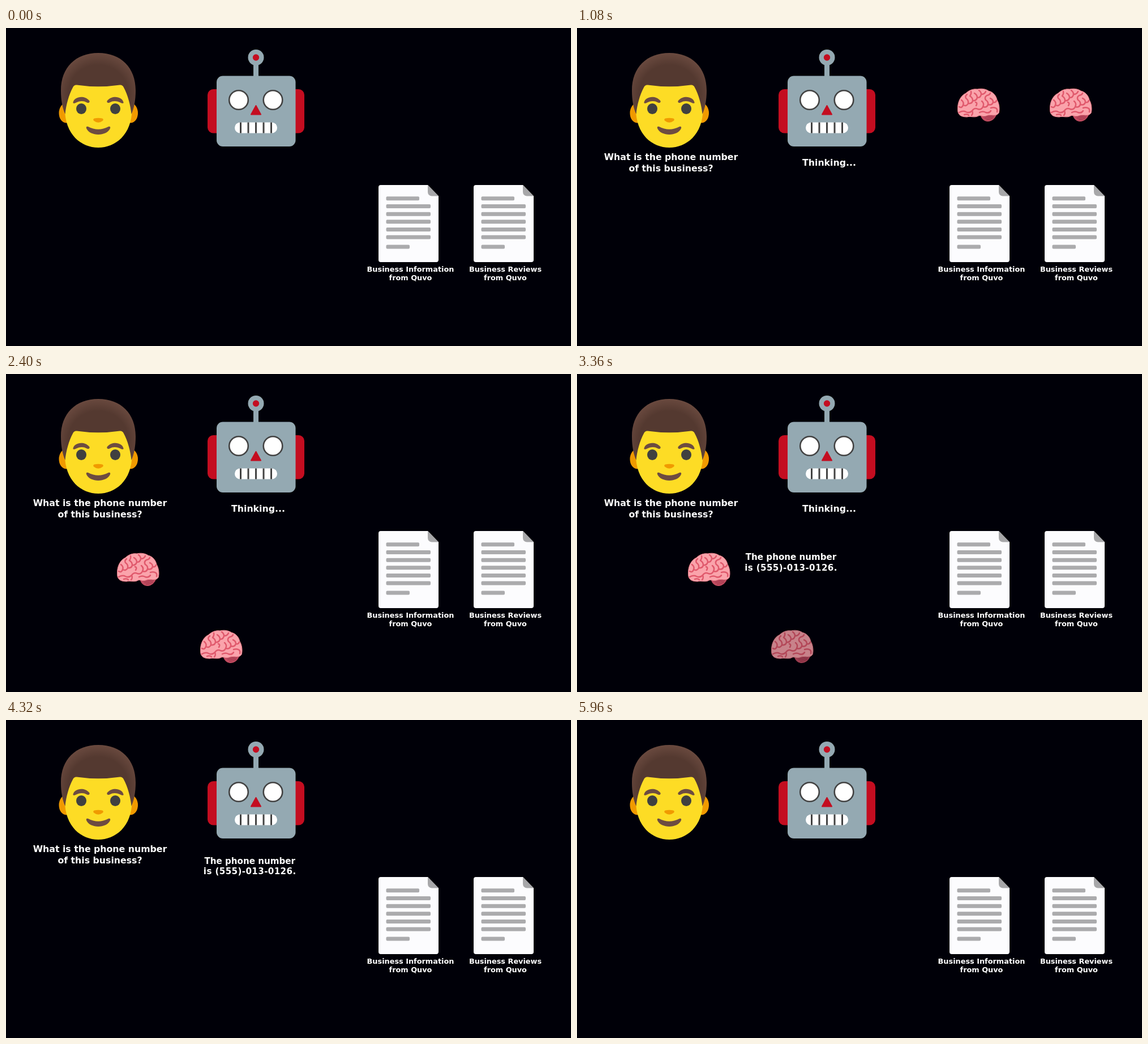
Recreate the animation shown at these times as an HTML page. Size 998 by 561 pixels, loop 6.04 s.

```html
<!DOCTYPE html>
<html lang="en">
<head>
<meta charset="utf-8">
<title>Asking the robot</title>
<style>
  html, body { margin: 0; width: 100%; height: 100%; overflow: hidden; background: #000008; }
  svg { display: block; width: 100%; height: 100%; }
  text { font-family: "DejaVu Sans", Verdana, sans-serif; font-weight: bold; fill: #fff; text-anchor: middle; }
  .big { font-size: 15.75px; }
  .reply { font-size: 15.1px; }
  .label { font-size: 12.85px; }
  .fold { fill: none; stroke: #e0596c; stroke-width: 2.5; stroke-linecap: round; stroke-linejoin: round; }
</style>
</head>
<body>
<svg viewBox="0 0 998 561">
  <defs>
    <radialGradient id="hairShade" gradientUnits="userSpaceOnUse" cx="163" cy="118" r="78">
      <stop offset=".68" stop-color="#543930"/>
      <stop offset="1" stop-color="#6d4c41"/>
    </radialGradient>

    <g id="brain">
      <path fill="#c24c61" d="M3 15C12 9 26 10 33 12C32 22 25 29 16 29C8 28 4 22 3 15Z"/>
      <path fill="none" stroke="#993549" stroke-width="1" d="M9 20Q20 22 31 15M11 23Q21 24 29 18M14 26Q21 26 27 22"/>
      <path fill="#faa3ab" stroke="#ea7d89" stroke-width="1"
        d="M-36.500 7C-37 -6 -31 -17 -22 -21C-16 -27 -8 -29 -2 -28C6 -30 14 -28 18 -25C27 -23 32 -15 33 -9C37 -3 38 8 36 14C31 21 23 16 16 18C8 22 5 17 0 19C-6 23 -15 19 -20 21C-30 21 -37 18 -36.500 7Z"/>
      <path class="fold" d="M-34 3Q-29 6 -27 0Q-25 -5 -30 -9M-27 0Q-21 3 -18 -3Q-17 -9 -22 -12Q-24 -16 -20 -19
        M-18 -3Q-11 -2 -10 -8Q-10 -13 -15 -16Q-12 -20 -13 -24M-10 -8Q-4 -7 -2 -13Q-2 -18 -7 -21M-2 -13Q4 -13 5 -19Q5 -23 1 -26
        M5 -19Q11 -19 13 -24M-34 13Q-27 9 -22 12Q-16 15 -11 10Q-7 4 -1 7Q5 9 8 3Q11 -3 6 -7
        M8 3Q15 5 17 -1Q18 -6 13 -9Q10 -14 15 -17Q20 -18 21 -21M17 -1Q24 1 26 -5Q26 -10 21 -12M26 -5Q31 -4 32 -8
        M22 5Q28 3 32 6Q34 8 33 12M-11 10Q-9 15 -12 18M-25 17Q-20 15 -17 18M2 13Q8 10 13 13Q19 15 22 10M-4 1Q-1 -4 -5 -5"/>
    </g>

    <g id="doc">
      <path fill="#fcfcfe" d="M662 277H745L764 296.500V409Q764 413 760 413H662Q658 413 658 409V281Q658 277 662 277Z"/>
      <path fill="#a7a7a9" d="M745 277L764 296.500H752Q745 296 745 289Z"/>
      <g id="rows" fill="#ababad"></g>
    </g>
  </defs>

  <rect width="998" height="561" fill="#000008"/>

  <use id="brainA" href="#brain"/>
  <use id="brainB" href="#brain"/>

  <g id="man">
    <g fill="#f09a00">
      <ellipse cx="106" cy="150" rx="12.500" ry="17.500"/>
      <ellipse cx="220.500" cy="150" rx="12.500" ry="17.500"/>
    </g>
    <path fill="#fddc25" d="M163 64C198 64 222.500 98 222.500 143C222.500 188 193 211 163 211C133 211 104 188 104 143C104 98 128 64 163 64Z"/>
    <path fill="url(#hairShade)" d="M163 44C203 44 229 70 229 110C229 128 226 142 221.500 152C220 136 215 118 208 105Q206 100 201 100.500Q163 106 125 100.500Q120 100 118 105C111 118 106 136 104.500 152C100 142 97 128 97 110C97 70 123 44 163 44Z"/>
    <g fill="#6d4c41">
      <path id="brow" d="M118.500 131C121 121 138 118 147 128C149 131 146 133 143 131.500C136 127.500 130 128.500 123 132C120 133.500 118 133 118.500 131Z"/>
      <use href="#brow" transform="matrix(-1 0 0 1 326 0)"/>
      <path d="M145 174Q163 183.500 181 174Q185 173 184 177C178 191.500 148 191.500 142 177Q141 173 145 174Z"/>
    </g>
    <g fill="#404040">
      <ellipse cx="133" cy="142.500" rx="9" ry="9.500"/>
      <ellipse cx="193" cy="142.500" rx="9" ry="9.500"/>
    </g>
    <path fill="#f09a00" d="M156 159.500Q163 158 170 159.500Q173 161 171 163.500Q163 170 155 163.500Q153 161 156 159.500Z"/>
  </g>

  <g id="robot">
    <g fill="#c40d20">
      <rect x="356" y="108" width="40" height="77.500" rx="10"/>
      <rect x="487" y="108" width="40" height="77.500" rx="10"/>
    </g>
    <g fill="#94a9b2">
      <rect x="437" y="60" width="9" height="28"/>
      <circle cx="441.500" cy="52" r="14"/>
      <rect x="372" y="84.500" width="139.500" height="124.500" rx="11"/>
    </g>
    <circle cx="441.500" cy="52" r="5.700" fill="#c40d20"/>
    <g fill="#fff" stroke="#424242" stroke-width="2.600">
      <circle cx="411" cy="127" r="16.800"/>
      <circle cx="471.500" cy="127" r="16.800"/>
    </g>
    <path fill="#c40d20" stroke="#c40d20" stroke-width="2" stroke-linejoin="round" d="M441.500 137L450 152.500H433Z"/>
    <rect x="404" y="166.500" width="75" height="19" rx="9.500" fill="#fff"/>
    <path stroke="#424242" stroke-width="3" d="M414.500 166.500v19m13.500 -19v19m13.500 -19v19m13.500 -19v19m13.500 -19v19"/>
  </g>

  <use href="#doc"/>
  <use href="#doc" x="168"/>
  <g class="label">
    <text x="714.500" y="429.500">Business Information</text>
    <text x="714.500" y="444.500">from Quvo</text>
    <text x="882" y="429.500">Business Reviews</text>
    <text x="882" y="444.500">from Quvo</text>
  </g>

  <g id="question" class="big">
    <text x="166" y="233">What is the phone number</text>
    <text x="166" y="252.500">of this business?</text>
  </g>
  <text id="thinking" class="big" x="445.500" y="242.500">Thinking...</text>
  <g id="answer" class="reply">
    <text y="-3.500">The phone number</text>
    <text y="15" letter-spacing=".4">is (555)-013-0126.</text>
  </g>
</svg>

<script>
const LOOP = 6040, STEP = 40;
const $ = id => document.getElementById(id);
const clamp = v => Math.min(1, Math.max(0, v));
const span = (t, from, to) => clamp((t - from) / (to - from));
const ease = p => (1 - Math.cos(Math.PI * p)) / 2;
const mix = (a, b, p) => a + (b - a) * p;

// Stops are [start, end, x, y]: eased travel to a new point.
function along(t, start, stops) {
  let [x, y] = start;
  for (const [from, to, nx, ny] of stops) {
    const p = ease(span(t, from, to));
    x = mix(x, nx, p);
    y = mix(y, ny, p);
  }
  return [x, y];
}

function place(id, [x, y], alpha) {
  $(id).setAttribute('transform', `translate(${x.toFixed(2)} ${y.toFixed(2)})`);
  show(id, alpha);
}

function show(id, alpha) {
  $(id).setAttribute('opacity', alpha.toFixed(3));
}

// Fade in over a..b and out over c..d.
const fade = (t, a, b, c, d) => span(t, a, b) * (1 - span(t, c, d));

const HOME = [443, 123];
const pathA = [
  [358, 998, 709, 136],
  [1480, 1960, 711, 345],
  [1960, 2400, 233, 345],
  [3860, 4500, 415, 110]
];
const pathB = [
  [358, 998, 872, 136],
  [1480, 1960, 879, 345],
  [1960, 2400, 380, 481]
];

function draw(t) {
  show('question', fade(t, 0, 280, 4940, 5160));
  show('thinking', fade(t, 240, 520, 3700, 4100));
  place('brainA', along(t, HOME, pathA), fade(t, 320, 340, 3900, 4320));
  place('brainB', along(t, HOME, pathB), fade(t, 320, 340, 3280, 3680));
  place('answer', along(t, [378, 331.5], [[3860, 4500, 442.5, 240.5]]), fade(t, 2800, 3120, 5300, 5760));
}

function addRows() {
  const row = (y, w) => `<rect x="671.5" y="${y}" width="${w}" height="7" rx="2"/>`;
  let rows = row(297.3, 58.5) + row(382.5, 41.5);
  for (let i = 0; i < 5; i++) rows += row(311 + i * 13.65, 78.5);
  $('rows').innerHTML = rows;
}

addRows();
const begin = performance.now();
function tick() {
  const t = (performance.now() - begin) % LOOP;
  draw(Math.floor(t / STEP) * STEP);
  requestAnimationFrame(tick);
}
tick();
</script>
</body>
</html>
```
